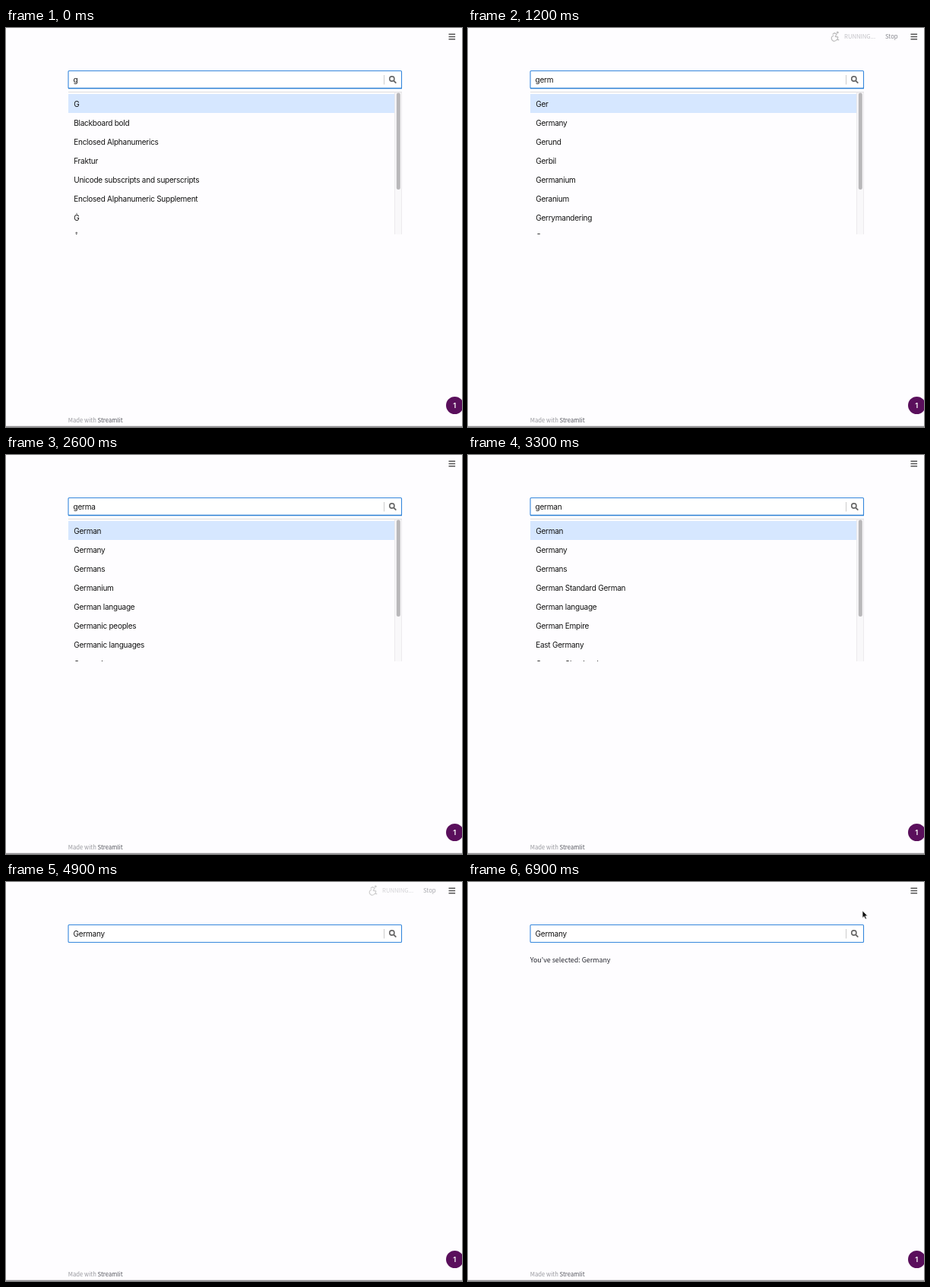
Recreate the animation shown at these times as an HTML page. Size 600x526 px, loop 7000 ms.

```html
<!DOCTYPE html>
<html lang="en">
<head>
<meta charset="utf-8">
<title>Search box</title>
<style>
  html, body { margin: 0; width: 100%; height: 100%; overflow: hidden; background: #fefdff; }
  svg { display: block; width: 600px; height: 526px; }
  .ui { font: 10px Inter, Roboto, sans-serif; letter-spacing: -.024em; fill: #111; }
  .page { font: 8.9px "Noto Sans CJK JP", "Noto Sans CJK SC", "Noto Sans CJK", "Open Sans", sans-serif; fill: #262730; }
  .small { font-size: 7.7px; }
</style>
</head>
<body>
<svg viewBox="0 0 600 526">
  <defs><clipPath id="menuClip"><rect x="81" y="82" width="441" height="190"/></clipPath></defs>

  <path d="M582.5 8.2h8.6M582.5 11.5h8.6M582.5 14.8h8.6" stroke="#555" stroke-width="1.4"/>
  <g id="status">
    <g fill="none" stroke="#bbb" stroke-width="1.2" stroke-linecap="round" stroke-linejoin="round">
      <circle cx="486.2" cy="5.9" r="1.1" fill="#bbb" stroke-width=".6"/>
      <path d="M480 8.2l2.1-1.6 3 1.4-1.8 3.3 3.4.6-.5 3.8h1.6M481 10a3.7 3.7 0 1 0 4.2 5.3"/>
    </g>
    <text class="page small" x="495" y="13.8" style="fill:#c2c2c6">RUNNING...</text>
    <text class="page small" x="549" y="13.8" style="fill:#85868c">Stop</text>
  </g>

  <rect x="82" y="56.5" width="438.5" height="23" rx="1" fill="#fff" stroke="#3587dc" stroke-width="1.1"/>
  <text id="query" class="ui" x="88.6" y="71.7"></text>
  <path id="caret" d="M128.5 61.5v13" stroke="#222"/>
  <path d="M497.5 62v12.5" stroke="#ccc"/>
  <g fill="none" stroke="#666" stroke-width="1.6">
    <circle cx="507.8" cy="67" r="3.1"/>
    <path d="M510 69.3l3.3 3.3" stroke-width="1.9"/>
  </g>

  <g id="menu">
    <path d="M82 79.6h439" stroke="#2b80d4" stroke-width="1.5"/>
    <g clip-path="url(#menuClip)">
      <path d="M82 84.4h439" stroke="#ddd"/>
      <rect x="82" y="87" width="430" height="25" fill="#d6e7ff"/>
      <g id="options" class="ui"></g>
      <rect x="511.5" y="85" width="9" height="190" fill="#f9f8fa" stroke="#e8e7e9" stroke-width=".8"/>
      <rect x="513.8" y="85.5" width="5" height="127.5" rx="2.5" fill="#b9b8ba"/>
    </g>
  </g>

  <text id="answer" class="page" x="81.7" y="106">You've selected: Germany</text>
  <text class="page small" x="81.7" y="519.8" style="fill:#97989d">Made with <tspan fill="#55565e">Streamlit</tspan></text>
  <circle cx="590.5" cy="497.5" r="11.5" fill="#5a0f5c"/>
  <text x="590.2" y="500.9" text-anchor="middle" fill="#fff" style="font:600 9.5px Inter,sans-serif">1</text>
  <path d="M0 525.4h600" stroke="#929194" stroke-width="1.2"/>
  <path id="pointer" d="M0 0v9.6l2.2-2 1.6 3.7 1.7-.8-1.6-3.5h3z" fill="#111" stroke="#fff" stroke-width=".7"/>
</svg>
<script>
const LOOP = 7000;
const results = {
  g: ["G", "Blackboard bold", "Enclosed Alphanumerics", "Fraktur", "Unicode subscripts and superscripts",
    "Enclosed Alphanumeric Supplement", "Ġ", "Â"],
  ge: ["Ge", "Gelvane Dynamics", ".ge", "Gepopo no Sunarō", "Gelvane Air", "Gelvane Clinic", "Gelvane Pay", "Gelvane Home"],
  ger: ["Ger", "Germany", "Gerund", "Gerbil", "Germanium", "Geranium", "Gerrymandering", "German"],
  germ: ["Germ", "Germ theory of disease", "Germ layer", "Mysophobia", "Germ cell", "Cereal germ", "Germ tube", "German"],
  germa: ["German", "Germany", "Germans", "Germanium", "German language", "Germanic peoples", "Germanic languages", "Germania"],
  german: ["German", "Germany", "Germans", "German Standard German", "German language", "German Empire",
    "East Germany", "German Shepherd"],
  germany: ["Germany", "East Germany", "Nazi Germany", "West Germany", "Germans", "Gelmora regional handball club",
    "States of Germany", "Germanic"]
};

// Each track is a list of [start ms, value]; the value holds until the next entry.
const tracks = {
  query: [[0, "g"], [100, "ge"], [1000, "ger"], [1200, "germ"], [2000, "germa"], [2800, "german"],
    [3600, "germany"], [4900, "Germany"]],
  menu: [[0, "g"], [400, "ge"], [1200, "ger"], [1500, "germ"], [2400, "germa"], [3100, "german"],
    [3900, "germany"], [4900, ""]],
  status: [[0, 0], [400, 1], [500, .13], [600, 0], [1100, 1], [1300, 0], [1500, 1], [1700, 0],
    [2400, 1], [2600, 0], [3000, 1], [3200, .4], [3300, 0], [3800, 1], [4000, .4], [4100, 0],
    [4900, .72], [5000, 1], [5100, 0]],
  caret: [[0, 0], [4400, 1], [4900, 0]],
  answer: [[0, 0], [5000, 1]],
  pointer: [[0, null], [6600, [192.5, 67.5]], [6700, [273.5, 56.5]], [6900, [519, 37.8]]]
};

const el = id => document.getElementById(id);
const valueAt = (track, t) => track.findLast(([start]) => start <= t)[1];
const show = (id, opacity) => el(id).setAttribute("opacity", opacity);
let shownMenu;

function setMenu(key) {
  if (key === shownMenu) return;
  shownMenu = key;
  show("menu", key ? 1 : 0);
  el("options").innerHTML = (results[key] || [])
    .map((label, i) => `<text x="89.2" y="${103.6 + 25 * i}">${label}</text>`).join("");
}

function draw() {
  const t = performance.now() % LOOP;
  const now = name => valueAt(tracks[name], t);
  el("query").textContent = now("query");
  setMenu(now("menu"));
  for (const id of ["status", "caret", "answer"]) show(id, now(id));
  const position = now("pointer");
  show("pointer", position ? 1 : 0);
  if (position) el("pointer").setAttribute("transform", `translate(${position})`);
  requestAnimationFrame(draw);
}
draw();
</script>
</body>
</html>
```
